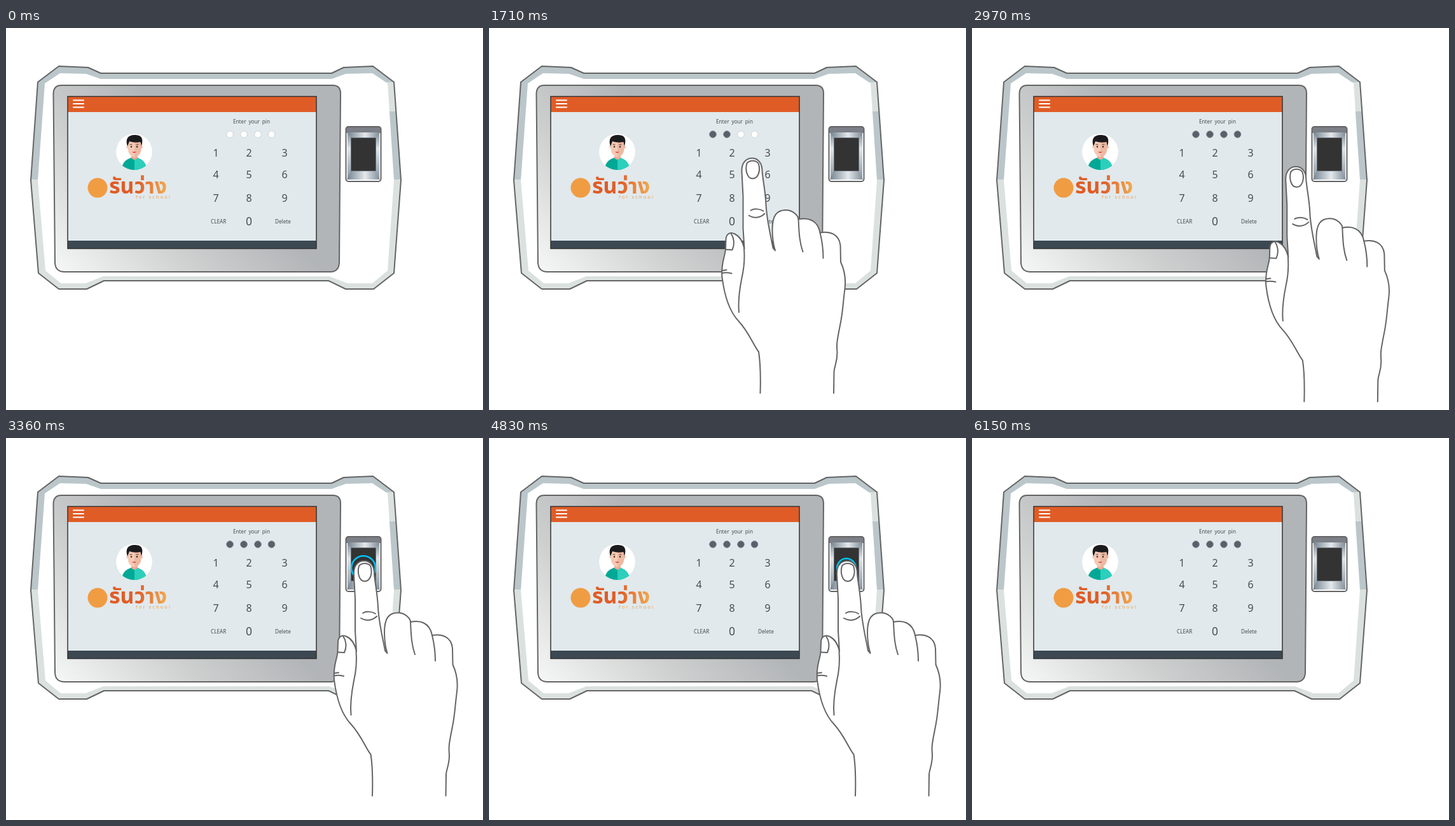
Write an HTML page that moves like this. It is 750 by 600 pixels and loops after 6600 ms.

```html
<!DOCTYPE html>
<html lang="en">
<head>
<meta charset="utf-8">
<title>PIN and fingerprint check</title>
<style>
  html, body { margin: 0; width: 100%; height: 100%; overflow: hidden; background: #fff; }
  svg { display: block; width: 750px; height: 600px; }
  text { font-family: "Noto Sans", "Open Sans", sans-serif; fill: #4a4c4f; }
  .line { fill: none; stroke: #646464; stroke-width: 2; stroke-linecap: round; stroke-linejoin: round; }
  .small { font-size: 8.2px; }
  .brand { font: 700 34px "Noto Sans Thai", "Noto Sans", sans-serif; fill: url(#wordmark); }
</style>
</head>
<body>
<svg viewBox="0 0 750 600">
  <defs>
    <linearGradient id="bezel" gradientUnits="userSpaceOnUse" x1="77" y1="383" x2="289" y2="171">
      <stop offset="0" stop-color="#f6f8f7"/><stop offset=".55" stop-color="#cdcfcf"/><stop offset="1" stop-color="#b2b5b7"/>
    </linearGradient>
    <linearGradient id="wordmark" gradientUnits="userSpaceOnUse" x1="205" y1="0" x2="253" y2="0">
      <stop offset="0" stop-color="#e05c26"/><stop offset="1" stop-color="#f2a950"/>
    </linearGradient>
    <linearGradient id="side" x2="0" y2="1">
      <stop offset="0" stop-color="#7f8c97"/><stop offset=".35" stop-color="#dfe4e8"/><stop offset="1" stop-color="#8b99a5"/>
    </linearGradient>
    <linearGradient id="edge">
      <stop offset="0" stop-color="#75838f"/><stop offset=".55" stop-color="#e3e8ec"/><stop offset="1" stop-color="#7f8c98"/>
    </linearGradient>
    <clipPath id="case"><path d="M50 85 83 60 129 62 149 71H512L531 62 577 60 610 85 621 239 610 385 578 410H534L507 397H154L127 410H83L51 385 39 239Z"/></clipPath>
    <clipPath id="round"><circle cx="201.5" cy="194.5" r="28.5"/></clipPath>
  </defs>

  <!-- case -->
  <g clip-path="url(#case)">
    <path fill="#bac6ca" d="M30 50H630V238H30Z"/>
    <path fill="#dae1df" d="M30 238H630V420H30ZM598 85H630V131H598Z"/>
  </g>
  <path fill="#fff" d="M61 87 85 71 126 72 149 80H512L534 72 576 71 600 87 610 239 600 381 576 401H537L508 390H153L125 401H86L62 381 50 239Z"/>
  <path class="line" d="M50 85 83 60 129 62 149 71H512L531 62 577 60 610 85 621 239 610 385 578 410H534L507 397H154L127 410H83L51 385 39 239Z"/>
  <path class="line" style="fill:url(#bezel)" d="M87 90H514Q526 90 526 103L524 369Q523 383 510 383H92Q78 383 77 369L74.500 103Q75 90 87 90Z"/>

  <!-- screen -->
  <path fill="#e1e9ec" d="M97 108H488V346H97Z"/>
  <path fill="#e05c26" d="M97 108H488V132H97Z"/>
  <path fill="#3c4852" d="M97 334H488V346H97Z"/>
  <path fill="none" stroke="#333" stroke-width="1.5" d="M97 107.500H488V346.500H97Z"/>
  <path stroke="#fff" stroke-width="2.200" stroke-linecap="round" d="M106 113.500H122M106 119H122M106 124.500H122"/>

  <!-- avatar -->
  <g clip-path="url(#round)">
    <circle cx="201.5" cy="194.5" r="28.5" fill="#fff"/>
    <path fill="#02a896" d="M181 224C183 211 188 207 196 204H207C215 207 220 211 222 224Z"/>
    <path fill="#2ccfbb" d="M202 205 207 204C215 207 220 211 222 224H202Z"/>
    <path fill="#e9ab92" d="M197 198H207V204Q202 210 197 204Z"/>
    <path fill="#f5cab5" d="M191.500 178Q202 171 212.500 178V190C212 198 206 203 202 203S192 198 191.500 190Z"/>
    <path fill="#edb9a2" d="M202 175Q208 175 212.500 178V190C212 198 206 203 202 203Z"/>
    <circle cx="191" cy="187" r="2" fill="#f5cab5"/><circle cx="213" cy="187" r="2" fill="#edb9a2"/>
    <path fill="#1b1b1d" d="M191 186C187 174 192 168 202 168S217 172 213 186L211.500 179Q202 181 194 178Z"/>
    <path stroke="#5b3a2c" d="M194.500 183H198.500M204.500 183H208.500"/>
    <circle cx="197" cy="186.500" r="1.200" fill="#222"/><circle cx="206" cy="186.500" r="1.200" fill="#222"/>
    <path fill="#d03b3b" d="M198 194.500H205Q201.500 198 198 194.500Z"/>
  </g>

  <circle cx="144" cy="251" r="15.5" fill="#f09c43"/>
  <text class="brand" x="162" y="260">รันว่าง</text>
  <text x="204" y="268" style="font-size:7.500px;letter-spacing:2.100px;fill:#eda04f">for school</text>

  <!-- keypad -->
  <text class="small" x="357" y="150" word-spacing="1.700">Enter your pin</text>
  <g id="dots"></g>
  <g id="keys" text-anchor="middle" font-size="16"></g>
  <text class="small" x="322" y="307">CLEAR</text>
  <text class="small" x="423" y="307">Delete</text>

  <!-- fingerprint reader -->
  <rect x="534.5" y="155" width="55" height="86" rx="4" fill="#fff"/>
  <path fill="#7c7f87" d="M535 165V159Q535 155 539 155H585Q589 155 589 159V165Z"/>
  <path fill="url(#side)" d="M537 164H587V237H537Z"/>
  <path fill="url(#edge)" d="M537 164H587L581 172H542Z"/>
  <path fill="url(#edge)" d="M542 224H581L588 238H536Z"/>
  <path fill="#333" stroke="#6a7078" d="M542.500 172.500H581.500V224.500H542.500Z"/>
  <rect class="line" x="534.5" y="155" width="55" height="86" rx="4"/>

  <circle id="ring" cx="562" cy="204" fill="none" stroke="#00c3f7" stroke-width="2.5"/>

  <g id="hand" class="line">
    <path fill="#fff" d="M346 554C347 520 346 505 343.500 489C336 480 328 458 312 441C295 423 289 396 286 372C284 350 290 342 291.500 328L292 312C293 302 300 301 306 304C314 308 319 318 321 327
      L319 295V245L317 207C316 192 324 185 333 185S349 192 349 205C350 220 354 235 355 258C356 280 361 300 366 326L369.500 330
      C365 316 365 305 365 297C365 275 372 267 385 266.500S406 276 406 281C420 278 436 281 440 302C455 299 470 304 472 322L472.500 348
      C479 362 480.500 378 479 390C475 422 476 427 471 450C466 475 466 478 467 490C467 506 463 510 462 520L461.500 554"/>
    <path d="M320.500 327C322 345 320 360 317 373C313 393 311 411 312.500 427M406 281C407 305 408 318 413 332M440 302C444 318 445 330 445 342"/>
    <path d="M325 193C322 203 325 217 334 217S347 204 343 193C339 187.500 329 187.500 325 193Z"/>
    <path d="M331 267C336 264 345 264 351 268M328 275C336 280 346 279 353 272M300 303C305 311 306 320 302 329L292 328.500M286 361.500 293 360.500M286 365.500C292 364 297 365 301 366"/>
  </g>
</svg>
<script>
const $ = id => document.getElementById(id);
const clamp = v => Math.min(1, Math.max(0, v));
const TICK = 30, LOOP = 6600;

$('dots').innerHTML = [352, 374, 396, 417.5]
  .map(x => `<circle cx="${x}" cy="167" r="5.3"/>`).join('');
$('keys').innerHTML = [...'1234567890'].map((d, i) => {
  const x = i === 9 ? 382 : [330, 382, 438][i % 3];
  const y = [201.5, 236, 273, 309.5][i / 3 | 0];
  return `<text x="${x}" y="${y}"${i === 9 ? ' font-size="17.5"' : ''}>${d}</text>`;
}).join('');

// Hand moves: start tick, number of steps, target offset
const moves = [
  [16, 13, 0, 0], [37, 8, 111, 3], [54, 8, 50, 36],
  [70, 8, 102.5, 67], [89, 19, 230, 8], [197, 9, 230, 424]
];
const pressed = [28, 44, 61, 77];
const pulses = [111, 136, 161];

function draw(tick) {
  let x = 250, y = 448;
  for (const [start, steps, tx, ty] of moves) {
    const p = clamp((tick - start + 1) / steps);
    x += (tx - x) * p;
    y += (ty - y) * p;
  }
  $('hand').setAttribute('transform', `translate(${x} ${y})`);

  [...$('dots').children].forEach((dot, i) => {
    const on = tick >= pressed[i];
    dot.setAttribute('fill', on ? '#58606a' : '#fff');
    dot.setAttribute('stroke', on ? '#7b838b' : '#cdd3d6');
  });

  const pulse = pulses.find(s => tick >= s && tick < s + 19);
  const u = pulse ? (tick - pulse) / 19 : 1;
  $('ring').setAttribute('r', 14.8 + 60 * (1 - (1 - u) ** 1.3));
  $('ring').setAttribute('opacity', 1 - u * u);
}

const begin = performance.now();
function frame() {
  draw(Math.floor((performance.now() - begin) % LOOP / TICK));
  requestAnimationFrame(frame);
}
frame();
</script>
</body>
</html>
```
